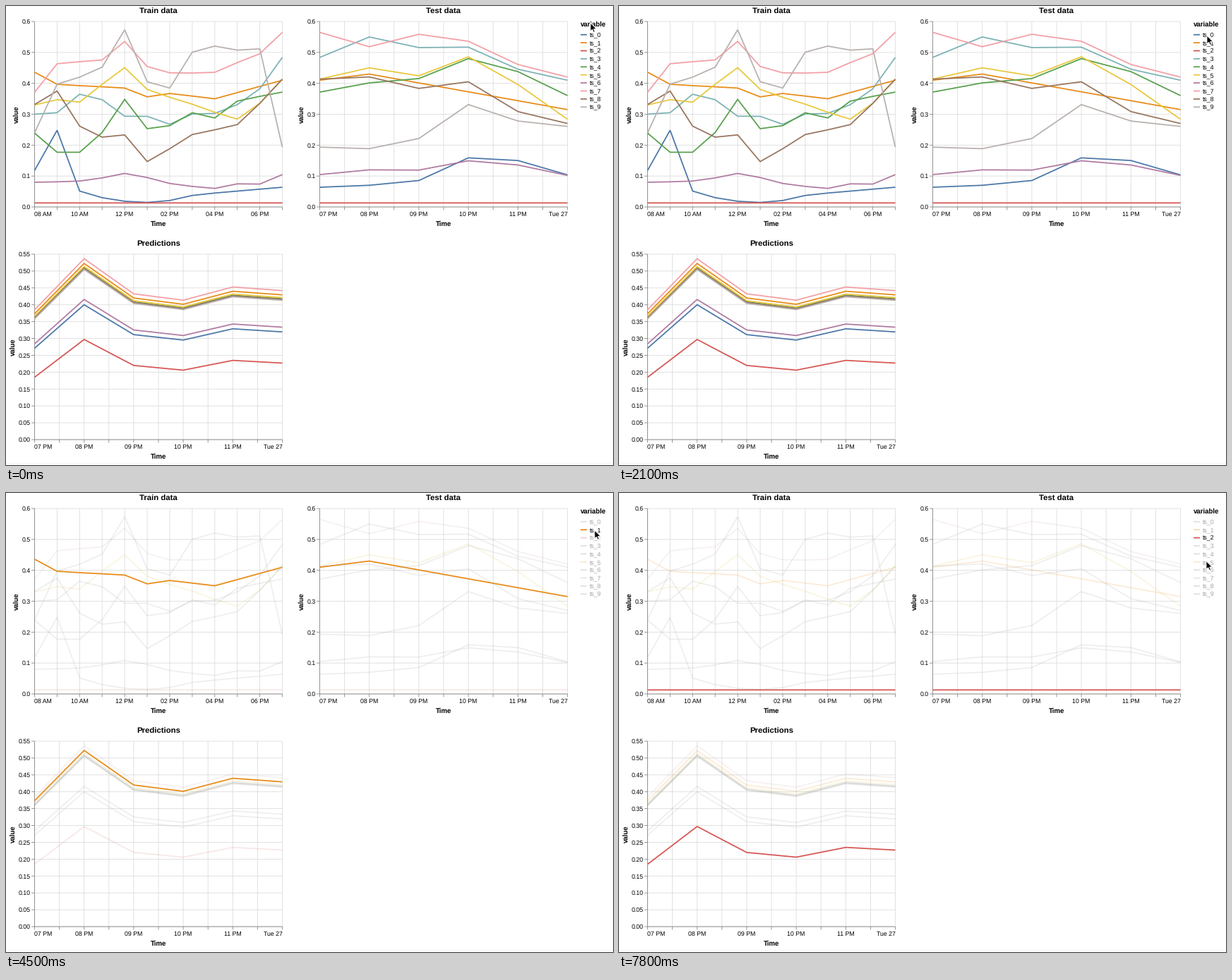
Recreate the animation shown at these times as a matplotlib script. Size 860 by 651 pixels, loop 8000 ms.

```python
import matplotlib.pyplot as plt
import numpy as np
from matplotlib.animation import FuncAnimation
from matplotlib.patches import Polygon

W, H, DPI = 860, 651, 64
STEP, FRAMES = 100, 80
SCALE = 351 / 400          # charts are 400 x 300 units, shown at 351 x 263 px
PW, PH = 351, 263

plt.rcParams["font.family"] = "Liberation Sans"
plt.rcParams["text.hinting"] = "none"

COLORS = ["#4b77a8", "#e88b17", "#d65653", "#7cb2b5", "#57a14c",
          "#e8c83b", "#b07aa1", "#f29fa6", "#98755f", "#b8b1ae"]
TINTS = {1: "#e88b17", 2: "#d87370", 5: "#e0c450", 7: "#d0a8aa"}
FADED = [TINTS.get(i, "#a0a09c") for i in range(10)]

HOURS = np.arange(17)      # 08 AM to midnight
SPLIT = 11                 # training ends and testing starts here


def trend(*levels):
    """Straight runs between evenly spaced levels."""
    return np.interp(HOURS, np.linspace(0, HOURS[-1], len(levels)), levels)


def bump(hour, size, width=.5):
    return size * np.exp(-((HOURS - hour) / width) ** 2)


SERIES = [
    trend(.06, .02, .045, .07, .1) + bump(.8, .215, .7)
    + bump(5.5, -.015, 1) + bump(14.4, .09, .9),
    trend(.4, .385, .35, .43, .315) + bump(0, .036) + bump(5, -.02),
    trend(.013),
    trend(.3, .29, .305, .55, .41) + bump(2.4, .085, .9) + bump(6, -.03)
    + bump(9.6, -.055, .9) + bump(14, .037),
    trend(.24, .24, .285, .4, .35) + bump(1.5, -.105, .7) + bump(4, .108)
    + bump(7, .031) + bump(9.3, .033, .8) + bump(14.3, .113, 1.1),
    trend(.33, .4, .31, .45, .28) + bump(2, -.026) + bump(3.8, .055, .7)
    + bump(9.4, -.078, .8) + bump(14.3, .135, .9),
    trend(.08, .085, .06, .12, .1) + bump(4.2, .024, 1.3)
    + bump(10, -.016) + bump(14.4, .048, .9),
    trend(.46, .48, .44, .55, .42) + bump(0, -.089) + bump(4, .06)
    + bump(6, -.026, 1.5) + bump(11, .043) + bump(12, -.037)
    + bump(13.6, .06, 1),
    trend(.33, .19, .25, .42, .27) + bump(1, .08) + bump(4, .048)
    + bump(5.3, -.068, .8) + bump(9, -.026) + bump(11, .036) + bump(14, .06),
    trend(.38, .46, .52, .19, .26) + bump(0, -.14) + bump(3.9, .118, .6)
    + bump(5.6, -.14, .75) + bump(9.7, .19, .7) + bump(11, -.085)
    + bump(14.15, .11, .8),
]
TRAIN = [s[:SPLIT + 1] for s in SERIES]
TEST = [s[SPLIT:] for s in SERIES]

# Every prediction is the lowest curve, lifted by its own share of the gap
LOW = np.array([.185, .297, .22, .206, .235, .227])
GAP = .127 + .332 * LOW
LIFT = [.457, 1, 0, .93, .942, .96, .526, 1.062, .935, .92]
PRED = [LOW + k * GAP for k in LIFT]

EVENING = ["07 PM", "08 PM", "09 PM", "10 PM", "11 PM", "Tue 27"]
MORNING = ["08 AM", "10 AM", "12 PM", "02 PM", "04 PM", "06 PM"]

# Cursor path: time, x, y
PATH = np.array([
    (0, 828, 24), (1300, 831, 38.5), (1800, 833, 42), (2900, 833, 42),
    (4000, 833.7, 52.3), (4600, 834, 53), (5400, 834, 62), (5700, 832, 68),
    (6700, 832, 68), (7400, 832, 96.5),
])
ARROW = np.array([(0, 0), (0, 11.8), (2.7, 9.3), (4.5, 13.3),
                  (6.4, 12.5), (4.7, 8.6), (8.4, 8.4)])
CLICKS = [2200, 4300, 6000]   # each picks the next series

fig = plt.figure(figsize=(W / DPI, H / DPI), dpi=DPI, facecolor="white")
ax = fig.add_axes([0, 0, 1, 1])
ax.set_xlim(0, W)
ax.set_ylim(H, 0)
ax.axis("off")


def pt(px):
    return px * 72 / DPI


def line(xs, ys, color, width=SCALE, z=1):
    return ax.plot(xs, ys, color=color, lw=pt(width), zorder=z, snap=False,
                   solid_capstyle="butt", solid_joinstyle="miter")[0]


def text(x, y, s, units=10, ha="center", bold=False, turn=0):
    """Text whose capitals are centred on y."""
    size = units * SCALE
    shift = 0 if turn else .36 * size
    return ax.text(x, y + shift, s, fontsize=pt(size), ha=ha, va="baseline",
                   weight="bold" if bold else "normal", color="black",
                   rotation=turn, rotation_mode="anchor", zorder=5)


def chart(x0, y0, title, data, ymax, ystep, digits, labels, n_ticks, value_x):
    """Draw axes and grid, return the series lines."""
    x1, y1 = x0 + PW, y0 + PH
    tick = 5 * SCALE
    text(x0 + PW / 2, y0 - 15.2, title, 13, bold=True)
    text(x0 + PW / 2, y1 + 23, "Time", 11, bold=True)
    text(value_x, y0 + PH / 2, "value", 11, bold=True, turn=90)

    for v in np.arange(0, ymax + ystep / 2, ystep):
        y = y1 - v / ymax * PH
        line([x0, x1], [y, y], "#dddddd")
        line([x0 - tick, x0], [y, y], "#888888", z=2)
        text(x0 - 6.1, y, f"{v:.{digits}f}", ha="right")

    ticks = np.linspace(x0, x1, n_ticks)
    for x in ticks:
        line([x, x], [y0, y1], "#dddddd")
        line([x, x], [y1, y1 + tick], "#888888", z=2)
    for x, s in zip(ticks[::2], labels):
        text(x, y1 + 10.2, s, ha="left" if x == x0 else "center")
    if n_ticks % 2:
        ax.texts[-1].set_ha("right")

    line([x0, x0], [y0, y1], "#888888", z=2)
    line([x0, x1], [y1, y1], "#888888", z=2)

    xs = np.linspace(x0, x1, len(data[0]))
    return [line(xs, y1 - ys / ymax * PH, c, 2 * SCALE, 3)
            for ys, c in zip(data, COLORS)]


charts = [
    chart(40.5, 22, "Train data", TRAIN, .6, .1, 1, MORNING, 12, 17.6),
    chart(444.5, 22, "Test data", TEST, .6, .1, 1, EVENING, 11, 421.6),
    chart(40.5, 352, "Predictions", PRED, .55, .05, 2, EVENING, 11, 13.2),
]
line([0, W], [648.5, 648.5], "#f3f3f3", 1)

text(813.5, 25.7, "variable", 11, ha="left", bold=True)
rows = [40.7 + 11.4 * i for i in range(10)]
marks = [line([814, 823], [y, y], c, 2 * SCALE, 3)
         for y, c in zip(rows, COLORS)]
names = [text(827.3, y, f"ts_{i}", ha="left") for i, y in enumerate(rows)]

cursor = ax.add_patch(Polygon(ARROW, closed=True, fc="black", ec="white",
                              lw=pt(.9), joinstyle="miter", zorder=10))


def update(frame):
    t = frame * STEP
    chosen = sum(t >= click for click in CLICKS) - 1

    for i in range(10):
        on = chosen in (-1, i)
        for part in [c[i] for c in charts] + [marks[i]]:
            part.set_color(COLORS[i] if on else FADED[i])
            part.set_alpha(1 if on else .17)
        marks[i].set_alpha(1 if on else .32)
        names[i].set_alpha(1 if on else .36)

    x, y = (np.interp(t, PATH[:, 0], PATH[:, k]) for k in (1, 2))
    cursor.set_xy(ARROW + (x, y))
    return [cursor]


anim = FuncAnimation(fig, update, frames=FRAMES, interval=STEP, repeat=True,
                     repeat_delay=0, blit=False)
plt.show()
```
